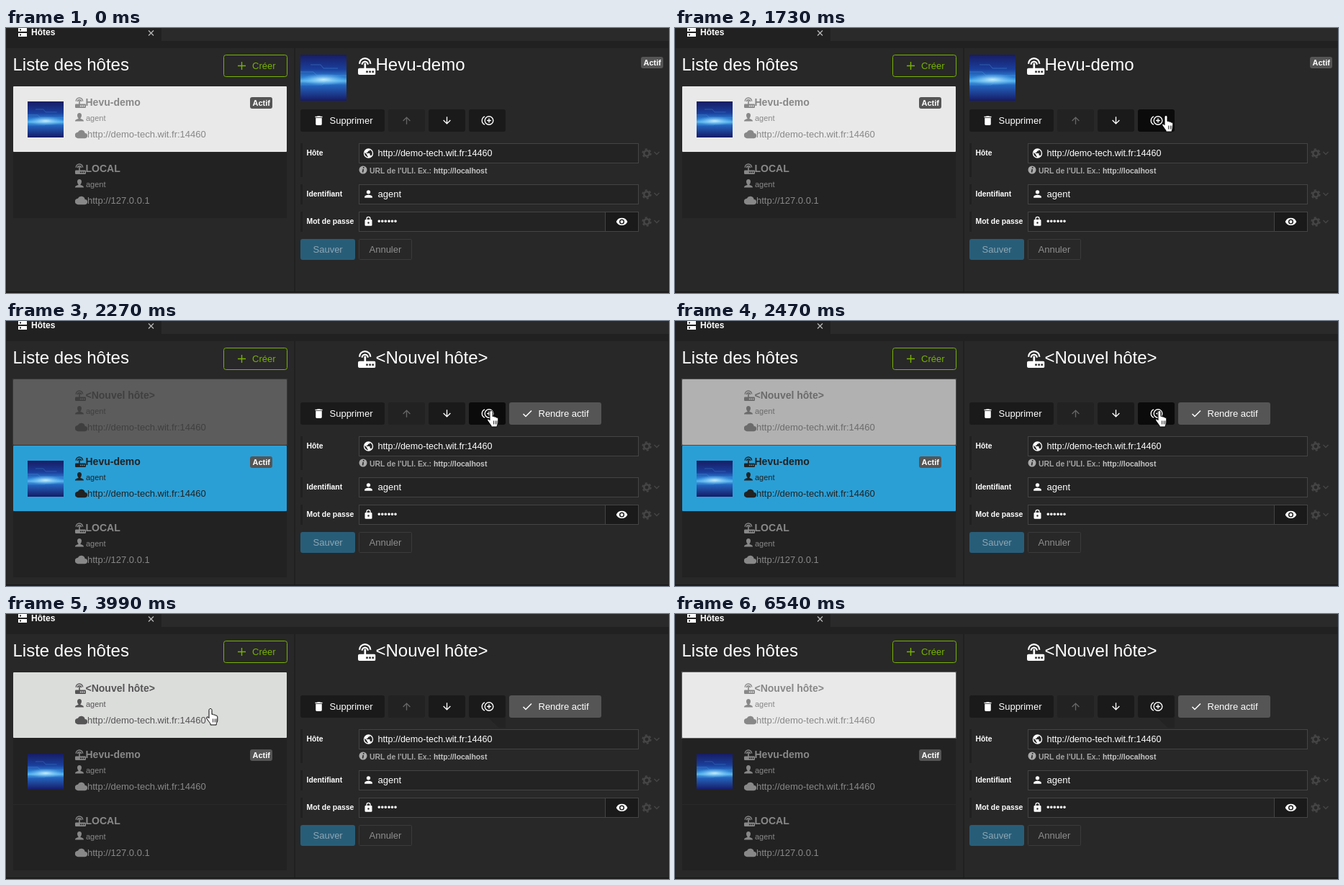
Recreate the animation shown at these times as an HTML page. Size 921x368 px, loop 6.6 s.

```html
<!DOCTYPE html>
<html lang="fr">
<head>
<meta charset="utf-8">
<title>Hôtes</title>
<style>
html, body { margin: 0; width: 100%; height: 100%; overflow: hidden; background: #222; }
svg { display: block; }
#stage { font: 13px "Liberation Sans", Arial, sans-serif; color: #fff; }
text, use { fill: currentColor; }
.h { font-size: 24px; }
.name { font-weight: bold; font-size: 14px; }
.user { font-size: 11px; }
.label { font-weight: bold; font-size: 10.4px; }
.field { font-size: 12.55px; }
.tag { font-weight: bold; font-size: 11px; color: #fff; }
.btn { fill: #1a1a1a; }
.input { fill: #232323; stroke: #444; }

.k { animation: 6.6s step-end infinite; }
.before { animation-name: before; }
.after { animation-name: after; }
.dup { animation-name: dup; }
.wedge { animation-name: wedge; }
.ring { animation-name: ring; }
.demo { animation-name: demo; }
.local { color: #888; animation-name: local; }
.fresh { animation-name: fresh; }
.fade { animation: fade 6.6s infinite; }
.cursor { animation: move 6.6s linear infinite; }
.arrow { animation-name: arrow; }
.hand { animation-name: hand; }

@keyframes before { 0% { visibility: visible } 31.82%, 100% { visibility: hidden } }
@keyframes after { 0% { visibility: hidden } 31.82%, 100% { visibility: visible } }
@keyframes dup { 0% { fill: #1a1a1a } 22.7% { fill: #0b0b0b } 45.9%, 100% { fill: #1a1a1a } }
@keyframes wedge { 0% { opacity: 0 } 45.9%, 100% { opacity: 1 } }
@keyframes ring { 0% { opacity: 1 } 45.9% { opacity: 0 } 99.09%, 100% { opacity: 1 } }
@keyframes demo {
  0% { transform: translateY(80px); color: #888; fill: #e9e9e9 }
  31.82% { transform: translateY(172px); color: #222; fill: #2a9fd6 }
  46.97% { transform: translateY(172px); color: #fff; fill: #272727 }
  58.48%, 100% { transform: translateY(172px); color: #888; fill: #222 }
}
@keyframes local { 0% { transform: translateY(172px) } 31.82%, 100% { transform: translateY(264px) } }
@keyframes fresh {
  0% { color: #888; fill: #e9e9e9 }
  51.2% { color: #555; fill: #dbdddb }
  99.09%, 100% { color: #888; fill: #e9e9e9 }
}
@keyframes fade {
  0% { opacity: 0 }
  31.82% { opacity: 0; animation-timing-function: ease }
  44.85%, 100% { opacity: 1 }
}
@keyframes move {
  0%, 14.85% { transform: translate(640px, 335px); animation-timing-function: ease-out }
  24.24% { transform: translate(683px, 126px) }
  26.2% { transform: translate(682px, 121px) }
  34.39% { transform: translate(674px, 124px) }
  37.4%, 45.45% { transform: translate(673px, 124px) }
  48.03% { transform: translate(346px, 174px) }
  51.2% { transform: translate(306px, 165px) }
  54.39%, 58.48% { transform: translate(288px, 120px) }
  60.45%, 81% { transform: translate(284px, 131px); animation-timing-function: ease-in }
  87.7%, 100% { transform: translate(772px, 368px) }
}
@keyframes arrow {
  0% { opacity: 0 } 14.85% { opacity: 1 } 22.7% { opacity: 0 }
  83.5% { opacity: 1 } 87.7%, 100% { opacity: 0 }
}
@keyframes hand { 0% { opacity: 0 } 22.7% { opacity: 1 } 83.5%, 100% { opacity: 0 } }
</style>
</head>
<body>
<svg id="stage" width="921" height="368" viewBox="0 0 921 368">
  <defs>
    <linearGradient id="sky" x2="0" y2="1">
      <stop offset="0" stop-color="#171c63"/>
      <stop offset=".32" stop-color="#1a3f9c"/>
      <stop offset=".5" stop-color="#2f86d8"/>
      <stop offset=".57" stop-color="#58b4ec"/>
      <stop offset=".66" stop-color="#2467c0"/>
      <stop offset="1" stop-color="#161a66"/>
    </linearGradient>
    <radialGradient id="glow" gradientTransform="translate(0 .41) scale(1 .26)">
      <stop offset="0" stop-color="#d8f6ff" stop-opacity=".9"/>
      <stop offset="1" stop-color="#6cc8ff" stop-opacity="0"/>
    </radialGradient>
    <symbol id="photo" viewBox="0 0 64 64">
      <rect width="64" height="64" fill="url(#sky)"/>
      <rect width="64" height="64" fill="url(#glow)"/>
      <path d="M0 24h18l5 5h41M0 42h30l5-4h29M14 14h14l4 5h20" fill="none" stroke="#5ab0f0" stroke-opacity=".35"/>
    </symbol>
    <symbol id="router" viewBox="0 0 24 24">
      <path d="M2 9a7.5 7.5 0 0 1 15 0M5.5 10a4 4 0 0 1 8 0" fill="none" stroke="currentColor" stroke-width="2.2"/>
      <path d="M8.3 8h2.6v7H22a2 2 0 0 1 2 2v5a2 2 0 0 1-2 2H2a2 2 0 0 1-2-2v-5a2 2 0 0 1 2-2h6.300zM11 18.500v2.500h2.500v-2.500zM15 18.500v2.500h2.500v-2.500zM19 18.500v2.500h2.500v-2.500z" fill-rule="evenodd"/>
    </symbol>
    <symbol id="user" viewBox="0 0 12 12">
      <path d="M6 0c2 0 3 1.400 3 3.200S8 7 7.500 7.300v.8c2 .7 4.500 1.200 4.500 3.400H0C0 9.300 2.500 8.800 4.500 8.100v-.8C4 7 3 5 3 3.200S4 0 6 0z"/>
    </symbol>
    <symbol id="cloud" viewBox="0 0 24 24">
      <path d="M19.350 10A7.500 7.500 0 0 0 5.350 8 6 6 0 0 0 6 20h13a5 5 0 0 0 .35-10z"/>
    </symbol>
    <symbol id="trash" viewBox="0 0 24 24">
      <path d="M6 19a2 2 0 0 0 2 2h8a2 2 0 0 0 2-2V7H6zM19 4h-3.500l-1-1h-5l-1 1H5v2h14z"/>
    </symbol>
    <symbol id="up" viewBox="0 0 24 24">
      <path d="M4 12l1.400 1.400L11 7.800V20h2V7.800l5.600 5.600L20 12l-8-8z"/>
    </symbol>
    <symbol id="person" viewBox="0 0 24 24">
      <circle cx="12" cy="8" r="4"/><path d="M12 14c-2.700 0-8 1.300-8 4v2h16v-2c0-2.700-5.300-4-8-4z"/>
    </symbol>
    <symbol id="lock" viewBox="0 0 24 24">
      <path d="M8 9V6a4 4 0 0 1 8 0v3" fill="none" stroke="currentColor" stroke-width="2"/>
      <path d="M6 8h12a2 2 0 0 1 2 2v10a2 2 0 0 1-2 2H6a2 2 0 0 1-2-2V10a2 2 0 0 1 2-2zm6 5a2 2 0 0 0 0 4 2 2 0 0 0 0-4z" fill-rule="evenodd"/>
    </symbol>
    <symbol id="globe" viewBox="0 0 24 24">
      <path d="M12 2a10 10 0 0 0 0 20 10 10 0 0 0 0-20zm-1 17.900A8 8 0 0 1 4.200 10.200L9 15v1a2 2 0 0 0 2 2zm6.900-2.500A2 2 0 0 0 16 16h-1v-3a1 1 0 0 0-1-1H8v-2h2a1 1 0 0 0 1-1V7h2a2 2 0 0 0 2-2v-.4a8 8 0 0 1 2.900 12.800z"/>
    </symbol>
    <symbol id="eye" viewBox="0 0 24 24">
      <path d="M12 4.500A12 12 0 0 0 1 12a12 12 0 0 0 22 0A12 12 0 0 0 12 4.500zM12 7a5 5 0 0 1 0 10 5 5 0 0 1 0-10z" fill-rule="evenodd"/>
      <circle cx="12" cy="12" r="3"/>
    </symbol>
    <g id="more" fill="none" stroke="#454545">
      <circle cx="890" r="3.700" stroke-width="2.600"/>
      <circle cx="890" r="5.700" stroke-width="2" stroke-dasharray="2.980"/>
      <path d="M900.500 -2l3.500 3.500 3.500-3.500" stroke-width="1.500"/>
    </g>
    <g id="badge">
      <rect width="31" height="16" rx="3" fill="#555"/>
      <text class="tag" x="3.500" y="12">Actif</text>
    </g>
    <g id="host">
      <use href="#router" x="96" y="16" width="15" height="15"/>
      <use href="#user" x="96" y="38" width="12" height="12"/>
      <text class="user" x="111" y="49">agent</text>
      <use href="#cloud" x="96" y="59" width="17" height="17"/>
    </g>
  </defs>

  <!-- Frame -->
  <rect width="921" height="368" fill="#212121"/>
  <path d="M216 0h705v18H216z" fill="#2a2a2a"/>
  <path d="M1 28h399v338H1zM402 28h518v338H402z" fill="#282828"/>
  <path d="M0 366.500h921" stroke="#1a1717"/>
  <path d="M17 0h12v5H17zM17 7h12v5H17z" fill="#fff"/>
  <path d="M19 1.500h2v2h-2zM19 8.500h2v2h-2z" fill="#222"/>
  <text x="35" y="10" font-size="12" font-weight="bold">Hôtes</text>
  <path d="M198 3.500l7 7m0-7l-7 7" stroke="#bbb" stroke-width="1.200"/>

  <!-- List -->
  <text class="h" x="9.500" y="59">Liste des hôtes</text>
  <rect x="302.500" y="37.500" width="88" height="30" rx="3" fill="none" stroke="#77b300"/>
  <path d="M322 52.500h11M327.500 47v11" stroke="#77b300" stroke-width="1.400"/>
  <text x="342" y="57" color="#77b300">Créer</text>

  <rect class="k after" x="10" y="81" width="380" height="275" fill="#222"/>
  <g class="k local">
    <rect x="10" width="380" height="92" fill="#222"/>
    <path d="M10 .5h380" stroke="#292929"/>
    <use href="#host"/>
    <text class="name" x="110.500" y="28">LOCAL</text>
    <text x="113" y="72">http://127.0.0.1</text>
  </g>
  <g class="k demo">
    <rect x="10" y="1" width="380" height="91" rx="1"/>
    <use href="#photo" x="30" y="22" width="50" height="50"/>
    <use href="#host"/>
    <text class="name" x="110.500" y="28">Hevu-demo</text>
    <text x="113" y="72">http://demo-tech.wit.fr:14460</text>
    <use href="#badge" x="339" y="16"/>
  </g>
  <g class="fade">
    <g class="k fresh" transform="translate(0 80)">
      <rect x="10" y="1" width="380" height="91" rx="1"/>
      <rect class="k ring" x="9.500" y=".5" width="381" height="92" fill="none" stroke="#999" stroke-dasharray="1"/>
      <use href="#host"/>
      <text class="name" x="110.500" y="28">&lt;Nouvel hôte&gt;</text>
      <text x="113" y="72">http://demo-tech.wit.fr:14460</text>
    </g>
  </g>

  <!-- Details -->
  <use href="#router" x="489" y="40.500" width="24.500" height="24.500"/>
  <g class="k before">
    <use href="#photo" x="409" y="37" width="64" height="64"/>
    <text class="h" x="513.500" y="59">Hevu-demo</text>
    <use href="#badge" x="882" y="40"/>
  </g>
  <g class="k after">
    <text class="h" x="513.500" y="59">&lt;Nouvel hôte&gt;</text>
    <rect x="699" y="113" width="128" height="31" rx="3" fill="#555"/>
    <path d="M718.500 129l3.500 3.500 8-8" fill="none" stroke="#fff" stroke-width="1.500"/>
    <text x="739.500" y="133">Rendre actif</text>
  </g>

  <rect class="btn" x="409" y="113" width="117" height="31" rx="3"/>
  <use href="#trash" x="426" y="120" width="17" height="17"/>
  <text x="449.500" y="133">Supprimer</text>
  <rect x="531" y="113" width="51" height="31" rx="3" fill="#222"/>
  <use href="#up" x="548.500" y="120.500" width="16" height="16" color="#666"/>
  <rect class="btn" x="587" y="113" width="51" height="31" rx="3"/>
  <use href="#up" transform="rotate(180 612.500 128.500)" x="604.500" y="120.500" width="16" height="16"/>
  <path class="k wedge" d="M670 144h24v14h-9z" fill="#232323"/>
  <rect class="k dup" x="643" y="113" width="51" height="31" rx="3"/>
  <g fill="none" stroke="#fff" stroke-width="1.400">
    <circle cx="671" cy="128.500" r="5.800"/>
    <path d="M665 122.800a6.200 6.200 0 0 0 0 11.400M668 128.500h6M671 125.500v6"/>
  </g>

  <!-- Form -->
  <path d="M409 160h3v47h-3zM409 217h3v28h-3zM409 255h3v28h-3z" fill="#202020"/>
  <g class="label">
    <text x="417.500" y="177">Hôte</text>
    <text x="417.500" y="234">Identifiant</text>
    <text x="417.500" y="272">Mot de passe</text>
    <circle cx="496" cy="197" r="5.500" fill="#aaa"/>
    <path d="M496.700 193v1.700M496.300 196l-.8 4.500" stroke="#282828" stroke-width="1.600"/>
    <text x="505" y="202" color="#a5a5a5">URL de l'ULI. Ex.: <tspan fill="#c4c4c4">http://localhost</tspan></text>
  </g>
  <rect class="input" x="490.500" y="160.500" width="388" height="27"/>
  <rect class="input" x="490.500" y="217.500" width="388" height="27"/>
  <rect class="input" x="490.500" y="255.500" width="342" height="27"/>
  <rect x="832.500" y="255.500" width="46" height="27" fill="#1a1a1a" stroke="#444"/>
  <use href="#globe" x="495.500" y="166" width="16" height="16"/>
  <use href="#person" x="495.500" y="222.500" width="16" height="16"/>
  <use href="#lock" x="496" y="261" width="15" height="15"/>
  <use href="#eye" x="847" y="260.500" width="17" height="17"/>
  <text class="field" x="516.500" y="178">http://demo-tech.wit.fr:14460</text>
  <text x="516.500" y="235">agent</text>
  <text x="516" y="273">••••••</text>
  <use href="#more" y="174"/>
  <use href="#more" y="231"/>
  <use href="#more" y="269"/>

  <rect x="409" y="293" width="76" height="29" rx="3" fill="#285d78"/>
  <text x="426.500" y="312" color="#8fa7b3">Sauver</text>
  <rect x="490.500" y="293.500" width="73" height="28" rx="1" fill="none" stroke="#3b3b3b"/>
  <text x="504.500" y="312" color="#8f8f8f">Annuler</text>

  <g class="cursor" fill="#fff" stroke="#000">
    <path class="k arrow" d="M0 0v17l4-4 2.700 6.200 2.600-1.100L6.700 12H12z"/>
    <g class="k hand">
      <path transform="translate(-6)" d="M6 .5c1.300 0 2 .9 2 2v6c.8-.6 2.400-.3 2.700.7.9-.5 2.300-.1 2.500.9 1.300-.4 2.600.3 2.600 1.800v5c0 1.800-1.300 3-1.600 4.600V23H6v-1.500C4.800 19.500 2 16 .8 14c-.8-1.400.8-2.800 2.200-1.600l1 1.200V2.500c0-1.100.8-2 2-2z"/>
      <path d="M3.500 14.500v5M6 14.500v5M8 14.500v5" stroke-width=".8"/>
    </g>
  </g>
</svg>
</body>
</html>
```
